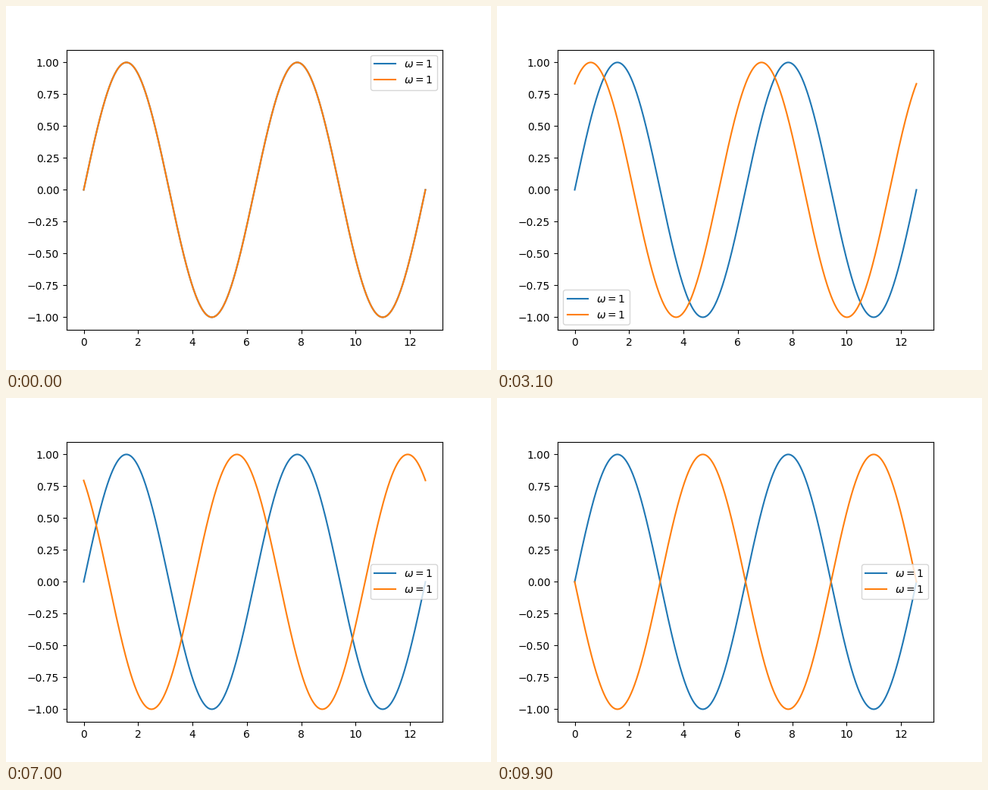
Recreate the animation shown at these times as a matplotlib script. Size 640 px wide and 480 px high, loop 10000 ms.

```python
import numpy as np
import matplotlib.pyplot as plt
from matplotlib.animation import FuncAnimation

FRAMES = 100
INTERVAL = 100  # ms

x = np.linspace(0, 4 * np.pi, 1000)
phases = np.linspace(0, np.pi, FRAMES)

fig, ax = plt.subplots(figsize=(6.4, 4.8), dpi=100)
ax.plot(x, np.sin(x), label=r"$\omega=1$")
moving, = ax.plot(x, np.sin(x), label=r"$\omega=1$")

# "best" is evaluated on every draw, so the legend dodges the moving wave.
ax.legend(loc="best")


def update(i):
    moving.set_ydata(np.sin(x + phases[i]))
    return moving,


anim = FuncAnimation(fig, update, frames=FRAMES, interval=INTERVAL,
                     repeat=True, repeat_delay=0, blit=False)

plt.show()
```
